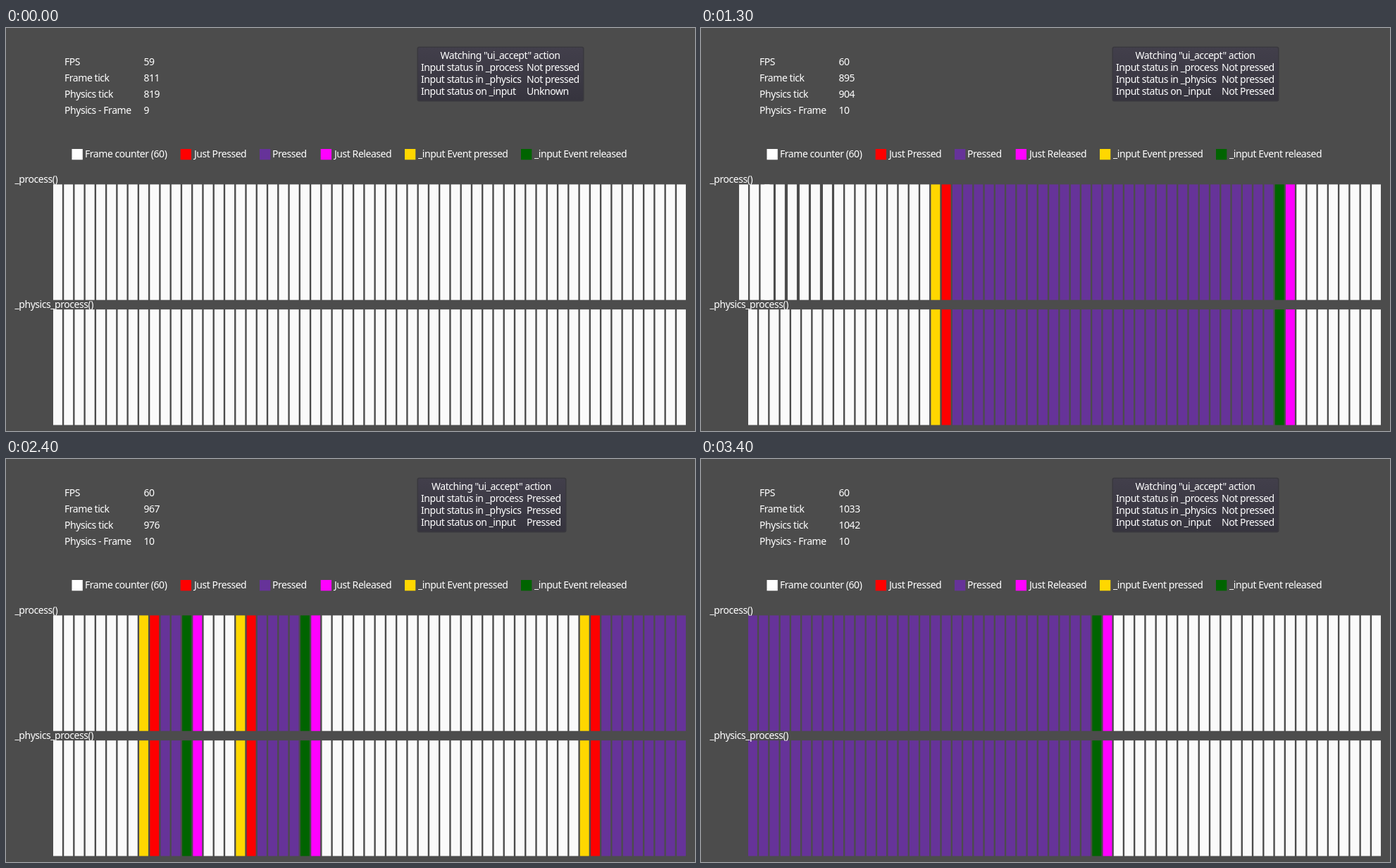
Write an HTML page with a canvas that moves like this. It is 978 px wide and 573 px high and loops after 3500 ms.

```html
<!DOCTYPE html>
<html>
<head>
<meta charset="utf-8">
<style>
html, body { margin: 0; overflow: hidden; background: #4c4c4c; }
canvas { display: block; }
</style>
</head>
<body>
<canvas id="stage" width="978" height="573"></canvas>
<script>
const ctx = document.getElementById('stage').getContext('2d');
const LOOP = 3500, STEP = 100, PITCH = 15.26, SLOTS = 59;
const WHITE = '#fafafa', RED = '#ff0000', PURPLE = '#663399',
      MAGENTA = '#ff00ff', GOLD = '#ffd700', GREEN = '#006400';

// [ms, tick] pairs of the frame counter
const clock = [[0, 811], [900, 869], [1300, 895], [1700, 921], [2100, 947], [2800, 993], [3400, 1033]];
// [tick of the press event, tick of the release event]
const presses = [[854, 886], [917, 921], [926, 932], [958, 1007]];
// a short stutter moves the upper bars out of step, from HITCH onwards
const HITCH = 839, drift = [-7.5, -6.8, -5, -3.3, -2.6, -0.8];
const driftAt = n => n < HITCH ? 2.3 : drift[n - HITCH] || 0;

const legend = [
  [93.5, 112, '#fff', 'Frame counter (60)'], [247.7, 267, RED, 'Just Pressed'],
  [360, 378, PURPLE, 'Pressed'], [446.7, 466, MAGENTA, 'Just Released'],
  [566, 585, GOLD, '_input Event pressed'], [731, 750, GREEN, '_input Event released']
];

function tickAt(ms) {
  const i = clock.findIndex(([end]) => ms <= end) || 1;
  const [t0, n0] = clock[i - 1], [t1, n1] = clock[i];
  return Math.round(n0 + (n1 - n0) * (ms - t0) / (t1 - t0));
}

// An input event repaints the bar of the tick before it takes effect.
function barColor(n, now) {
  for (const [down, up] of presses) {
    if (n === down && now > n) return GOLD;
    if (n === down + 1) return RED;
    if (n === up && now > n) return GREEN;
    if (n > down && n <= up) return PURPLE;
    if (n === up + 1) return MAGENTA;
  }
  return WHITE;
}

function rect(x, y, w, h, color) {
  ctx.fillStyle = color;
  ctx.fillRect(x, y, w, h);
}

function roundRect(x, y, w, h, r, color) {
  ctx.fillStyle = color;
  ctx.beginPath();
  ctx.roundRect(x, y, w, h, r);
  ctx.fill();
}

function text(str, x, y, align = 'left') {
  ctx.fillStyle = '#fff';
  ctx.textAlign = align;
  ctx.fillText(str, x, y);
}

function bars(y, now, shift) {
  for (let i = -1; i < SLOTS; i++) {
    const n = now - SLOTS + 1 + i;
    const x = 67 + i * PITCH + shift(n);
    if (x > 53) rect(x, y, 12.9, 164.3, barColor(n, now));
  }
}

function panel(now) {
  const pressed = presses.some(([down, up]) => now > down && now <= up);
  const state = pressed ? 'Pressed' : 'Not pressed';
  const event = pressed ? 'Pressed' : now > presses[0][0] ? 'Not Pressed' : 'Unknown';
  const w = pressed ? 209 : 234;
  const fill = ctx.createLinearGradient(0, 28, 0, 103);
  fill.addColorStop(0, '#423f4b');
  fill.addColorStop(1, '#36343e');
  roundRect(583.5, 26.5, w + 3, 78, 3, '#39383e');
  roundRect(585, 28, w, 75, 2, fill);
  text('Watching "ui_accept" action', 584.5 + w / 2, 44, 'center');
  [['in _process', state], ['in _physics', state], ['on _input', event]].forEach(([where, value], i) => {
    const y = 61 + i * 17;
    text('Input status ' + where, 589, y);
    text(value, 739, y);
  });
}

function draw(ms) {
  const now = tickAt(Math.floor(ms / STEP) * STEP);
  const late = now >= HITCH;
  const physics = now + (late ? 9 : 8);
  rect(0, 0, 978, 573, '#4c4c4c');
  ctx.font = '14px "Noto Sans", "Open Sans", sans-serif';
  ctx.letterSpacing = '-0.45px';

  [['FPS', late ? 60 : 59], ['Frame tick', now], ['Physics tick', physics],
   ['Physics - Frame', physics - now + 1]].forEach(([label, value], i) => {
    text(label, 83, 53 + i * 23);
    text(value, 195.5, 53 + i * 23);
  });
  panel(now);
  for (const [x, textX, color, label] of legend) {
    rect(x, 172, 15.3, 15.3, color);
    text(label, textX, 184);
  }
  bars(222.4, now, n => driftAt(n) - driftAt(now));
  bars(400.2, now, () => 0);
  text('_process()', 12.5, 220);
  text('_physics_process()', 12.5, 398);
}

const start = performance.now();
function loop() {
  draw((performance.now() - start) % LOOP);
  requestAnimationFrame(loop);
}
loop();
</script>
</body>
</html>
```
